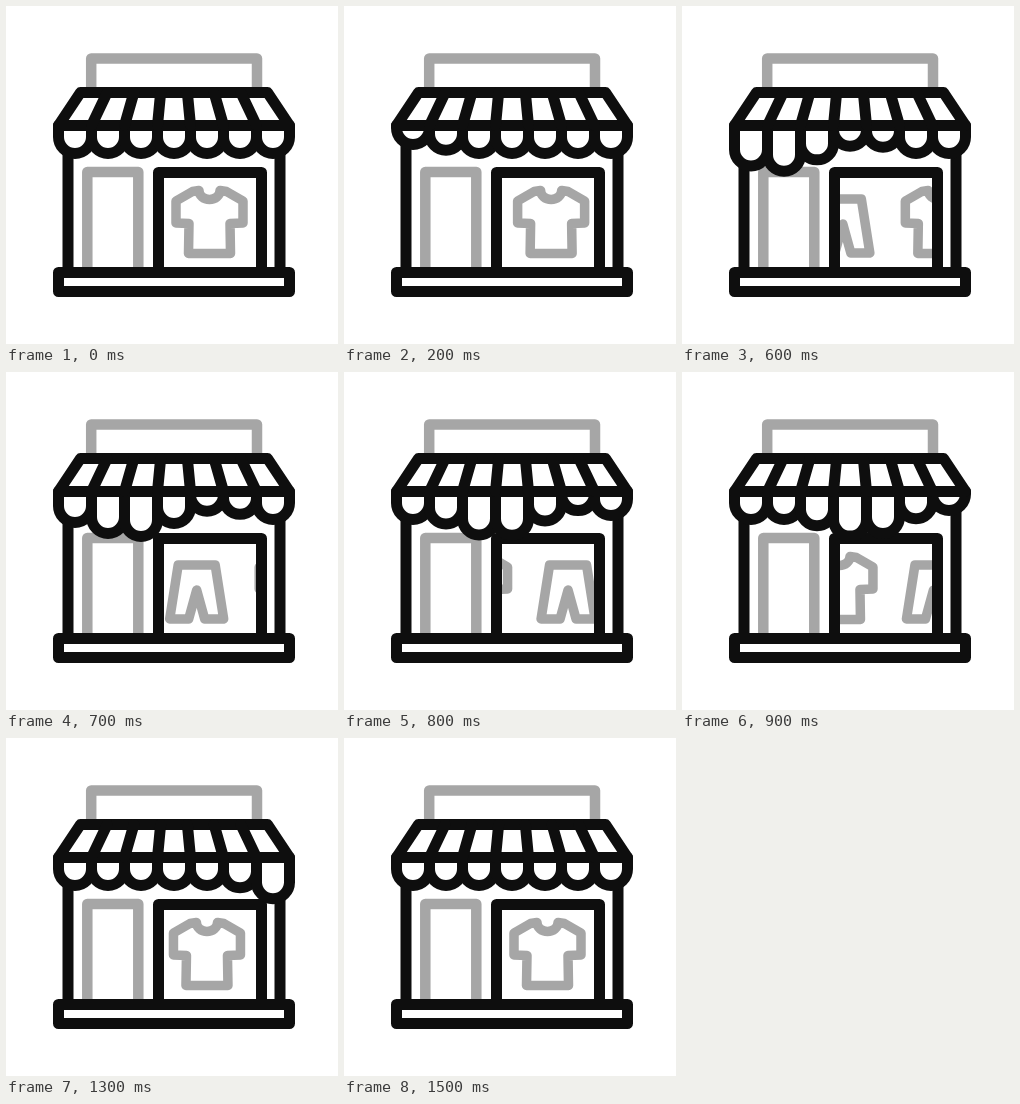
Recreate the animation shown at these times as an HTML page. Size 332x338 px, loop 1600 ms.

```html
<!DOCTYPE html>
<html lang="en">
<head>
<meta charset="utf-8">
<title>Shop</title>
<style>
  html, body { margin: 0; width: 100%; height: 100%; overflow: hidden; background: #fff; }
  svg { display: block; width: 332px; height: 338px; fill: none; stroke-linejoin: round; stroke-linecap: round; }
  .ink { stroke: #0e0e0e; stroke-width: 11; }
  .gray { stroke: #a6a6a6; stroke-width: 10.5; }
  .solid { fill: #fff; }
  #goods { stroke-width: 9.5; }
</style>
</head>
<body>
<svg viewBox="0 0 332 338">
  <defs>
    <clipPath id="pane"><rect x="152" y="166" width="103" height="100"/></clipPath>
    <path id="shirt" d="M-10.5 184.5A10.5 9 0 0 0 10.5 184.5L17 185.5L33.5 195V217L20.5 217.5L21 247.5H-21L-20.5 217.5L-33.5 217V195L-17 185.5Z"/>
    <path id="pants" d="M-18.5 193H18.5L27 247H8L0 218L-8 247H-27Z"/>
  </defs>
  <g class="gray">
    <path d="M85.2 86V52.5H251V86"/>
    <path d="M81.3 264V166H132.3V264"/>
    <g clip-path="url(#pane)">
      <g id="goods">
        <use href="#shirt"/>
        <use href="#pants" x="-96"/>
        <use href="#shirt" x="-190"/>
      </g>
    </g>
  </g>
  <g class="ink">
    <path d="M62 140V264M274 140V264"/>
    <path d="M152.5 264V166.5H255.5V264"/>
    <path class="solid" d="M52.5 266.5H283.5V285.5H52.5Z"/>
    <g id="flaps"></g>
    <path class="solid" d="M74.5 86.5H261.5L283.5 119.5H52.5Z"/>
    <path id="stripes"/>
  </g>
</svg>
<script>
const LOOP = 1600, STEP = 100;
const COUNT = 7, LEFT = 52.5, FLAP = 231 / COUNT, TOP = 119.5;
const SLIDE = 190, SLIDE_MS = 1470, LAG = 118;
const sway = [[0, 0], [200, -9], [500, 18], [770, 0]];
const goods = document.getElementById('goods');
const group = document.getElementById('flaps');

const smooth = s => s * s * (3 - 2 * s);

// Symmetric cubic-bezier(a, 0, 1 - a, 1)
function ease(u, a = 0.62) {
  if (u <= 0) return 0;
  if (u >= 1) return 1;
  let lo = 0, hi = 1;
  for (let i = 0; i < 24; i++) {
    const s = (lo + hi) / 2, r = 1 - s;
    const x = 3 * a * s * r * r + 3 * (1 - a) * s * s * r + s ** 3;
    if (x < u) lo = s; else hi = s;
  }
  return smooth(lo);
}

function drop(t) {
  for (let i = 1; i < sway.length; i++) {
    const [t0, y0] = sway[i - 1], [t1, y1] = sway[i];
    if (t >= t0 && t < t1) return y0 + (y1 - y0) * smooth((t - t0) / (t1 - t0));
  }
  return 0;
}

const flaps = Array.from({ length: COUNT }, () => {
  const p = document.createElementNS('http://www.w3.org/2000/svg', 'path');
  p.setAttribute('class', 'solid');
  return group.appendChild(p);
});

let bars = '';
for (let i = 1; i < COUNT; i++) bars += `M${74.5 + 187 / COUNT * i} 86.5L${LEFT + FLAP * i} ${TOP}`;
document.getElementById('stripes').setAttribute('d', bars);

function draw(t) {
  goods.setAttribute('transform', `translate(${203.5 + SLIDE * ease(t / SLIDE_MS)} 0)`);
  flaps.forEach((p, i) => {
    const x = LEFT + FLAP * i, y = 131 + drop(t - LAG * i), r = FLAP / 2;
    p.setAttribute('d', `M${x} ${TOP}V${y}A${r} ${r} 0 0 0 ${x + FLAP} ${y}V${TOP}`);
  });
}

const start = performance.now();
function tick() {
  const t = (performance.now() - start) % LOOP;
  draw(Math.floor(t / STEP) * STEP);
  requestAnimationFrame(tick);
}
tick();
</script>
</body>
</html>
```
